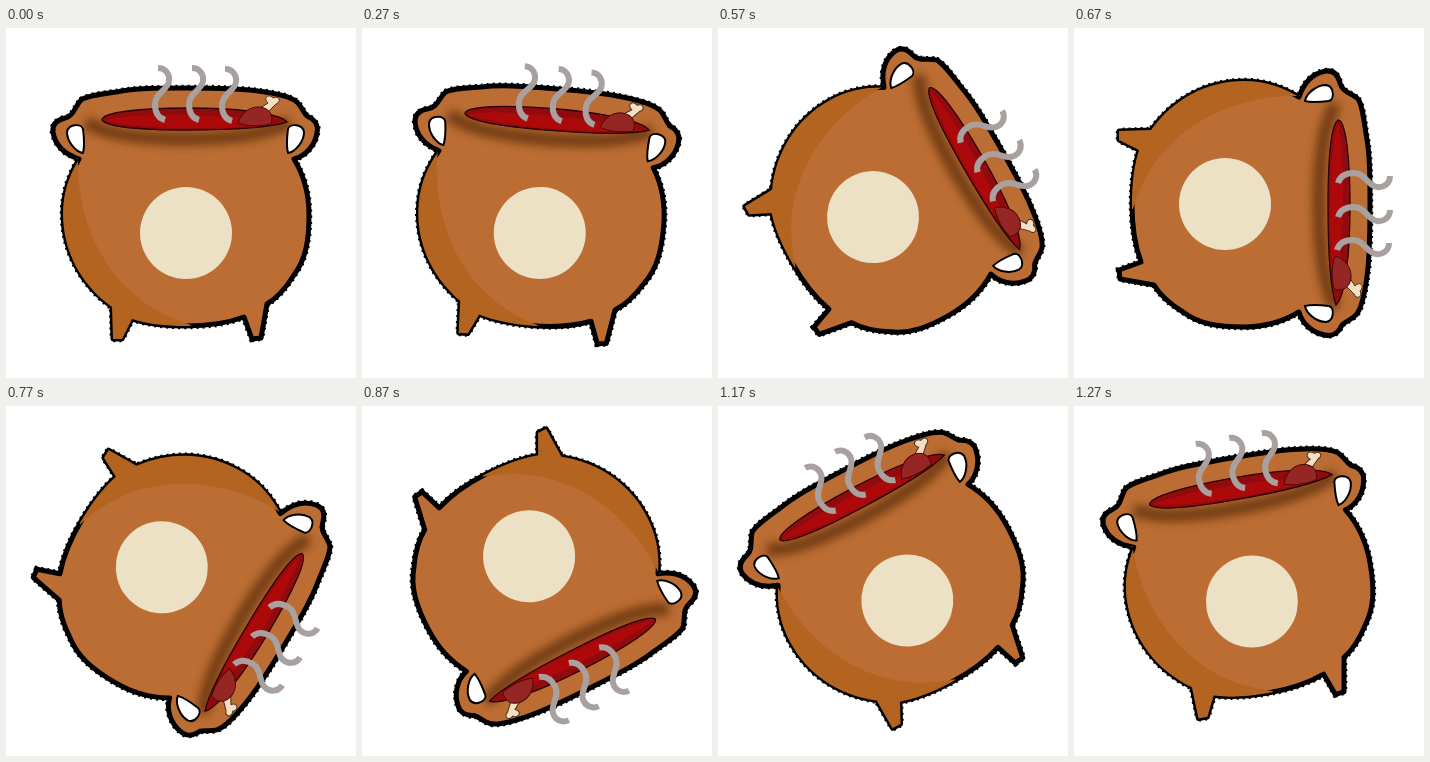
Animation of 350 by 350 pixels, one loop 1370 ms. Source, as an HTML page:

```html
<!DOCTYPE html>
<html lang="es">
<head>
<meta charset="utf-8">
<title>Rolling pot</title>
<style>
  html, body { margin: 0; width: 100%; height: 100%; overflow: hidden; background: #fff; }
  svg { display: block; width: 100vw; height: 100vh; }
</style>
</head>
<body>
<svg viewBox="0 0 350 350">
  <defs>
    <path id="body" d="M75 72 C80 68 95 66 110 64 C130 60 152 60 180 60 C209 60 232 60 252 63
      C268 65 284 68 291 74 C296 79 297 84 301 88 C308 91 313 97 311 105 C309 117 300 128 288 131
      C299 149 303 167 303 187 C303 212 300 231 288 247 C280 260 271 270 261 276 L255 310 L246 311 L238 289
      C222 295 203 298 180 298 C159 298 142 296 126 291 L116 311 L107 311 L106 279
      C74 256 57 222 57 186 C57 163 64 146 73 131 C58 126 49 117 47 104 C46 96 51 92 59 90 C68 88 69 78 75 72 Z"/>
    <path id="hole" d="M61 104 C62 96 75 95 77 101 C78 109 79 118 77 125 C70 124 61 114 61 104 Z"
      fill="#fff" stroke="#000" stroke-width="2"/>
    <path id="steam" d="M152 40 C160 40 164 47 163 53 C162 62 149 65 149 76 C149 85 152 90 159 92"
      fill="none" stroke="#a9a19f" stroke-width="6"/>
    <clipPath id="inside"><use href="#body"/></clipPath>
    <filter id="soft" x="-20%" y="-100%" width="140%" height="300%"><feGaussianBlur stdDeviation="4"/></filter>
  </defs>
  <g id="pot">
    <use href="#body" fill="none" stroke="#000" stroke-width="6.5" stroke-dasharray="2 4"/>
    <use href="#body" fill="#bb6d34" stroke="#000" stroke-width="5" stroke-linejoin="round"/>
    <g clip-path="url(#inside)">
      <path d="M40 130 L72 130 C70 185 95 270 185 297 L180 320 L40 320 Z" fill="#b26420"/>
      <path d="M80 94 C100 108 140 111 180 111 C220 111 260 108 284 94" fill="none"
        stroke="#673611" stroke-width="13" opacity=".85" filter="url(#soft)"/>
    </g>
    <use href="#hole"/>
    <use href="#hole" transform="translate(359) scale(-1 1)"/>
    <path d="M96 92 C96 84 135 80 182 80 C225 80 272 84 281 94 C264 100 224 102 182 102 C137 102 102 100 96 92 Z"
      fill="#8f0b0e" stroke="#2a0303" stroke-width="1.3"/>
    <path d="M99 92 C120 86 220 84 268 95 C224 102 130 102 99 92 Z" fill="#ad090b"/>
    <path d="M251 82 L262 75 C256 70 263 65 267 70 C273 67 276 74 270 76 L260 86 Z"
      fill="#f3dfc4" stroke="#4a2b1c" stroke-width="1"/>
    <path d="M232 95 C235 85 244 78 254 79 C263 80 268 87 265 96 C253 99 241 98 232 95 Z"
      fill="#962624" stroke="#4b0909" stroke-width="1"/>
    <use href="#steam"/>
    <use href="#steam" x="34"/>
    <use href="#steam" x="67" y="1"/>
    <circle cx="180" cy="205" r="46" fill="#ece1c4"/>
  </g>
</svg>
<script>
  const LOOP = 1370, HOLD = 270, STEP = 100;
  // angle in degrees, then shift in x and y
  const poses = [
    [0, 0, 0], [4.5, 0, 0], [16.7, 0, -1], [35.5, -1, -3], [60.2, 0, -2], [90, 0, -1],
    [121, 1, -1], [153, 1, -1], [276, 2, -3], [306.5, -1, -5], [332, -4, -7], [350, -7, -9]
  ];
  const pot = document.getElementById('pot');

  function draw(now) {
    const t = now % LOOP;
    const i = t < HOLD ? 0 : 1 + Math.floor((t - HOLD) / STEP);
    const [angle, x, y] = poses[i];
    pot.setAttribute('transform', `translate(${x} ${y}) rotate(${angle} 179.5 176.5)`);
  }

  const start = performance.now();
  function tick() {
    draw(performance.now() - start);
    requestAnimationFrame(tick);
  }
  tick();
</script>
</body>
</html>
```
